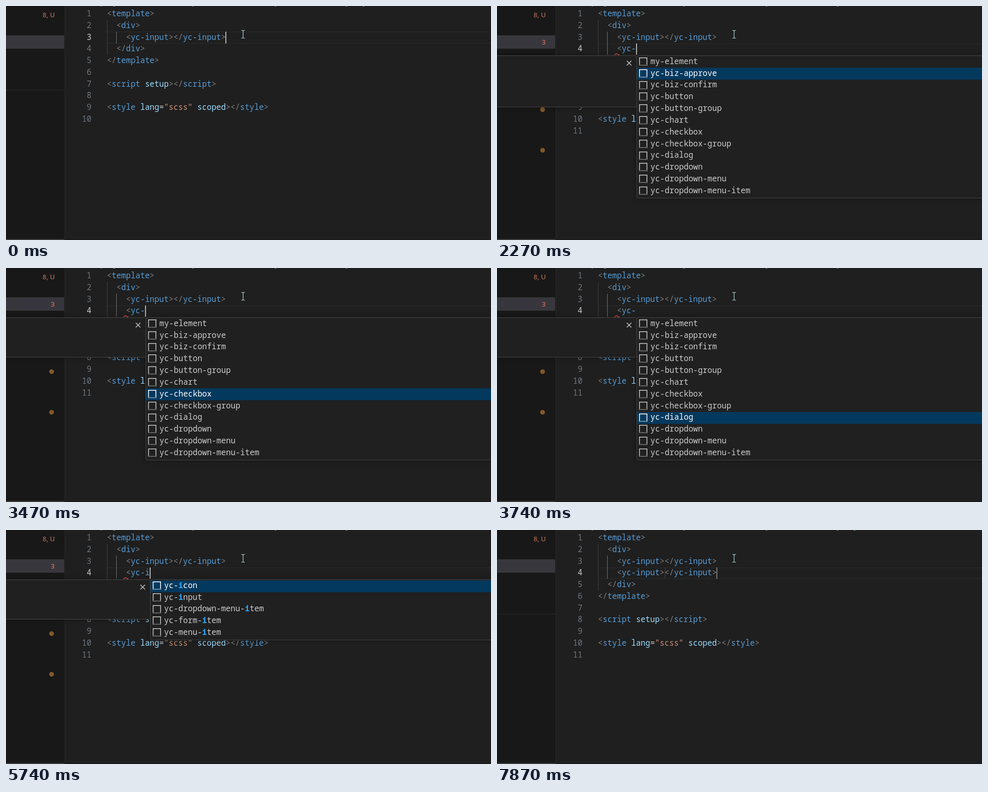
Animation of 942x455 px, one loop 8000 ms. Source, as an HTML page:

```html
<!DOCTYPE html>
<html lang="en">
<head>
<meta charset="utf-8">
<title>Component completion</title>
<style>
  html, body { margin: 0; width: 100%; height: 100%; overflow: hidden; background: #1f1f1f; }
  svg { display: block; }
  text { white-space: pre; font: 15.4px "Noto Sans Mono", "DejaVu Sans Mono", monospace; }
  .item { font-weight: 500; }
  .badge { font: 600 13px "Open Sans", "Noto Sans", sans-serif; }
  .popup { filter: drop-shadow(0 0 4px rgba(0, 0, 0, .4)); }
</style>
</head>
<body>
<svg id="stage" width="942" height="455" viewBox="0 0 942 455"></svg>
<script>
const LOOP = 8000, LEFT = 196, LINE = 22.78, ROW = 22.82;
const INPUT = '    <yc-input></yc-input>';

const ALL = ['my-element', 'yc-biz-approve', 'yc-biz-confirm', 'yc-button', 'yc-button-group',
  'yc-chart', 'yc-checkbox', 'yc-checkbox-group', 'yc-dialog', 'yc-dropdown',
  'yc-dropdown-menu', 'yc-dropdown-menu-item', 'yc-flow-chart'];
// Brackets mark the matched letters
const WITH_I = ['yc-[i]con', 'yc-[i]nput', 'yc-dropdown-menu-[i]tem', 'yc-form-[i]tem', 'yc-menu-[i]tem'];
const WITH_IN = ['yc-[in]put', 'yc-[i]co[n]'];

// Each step changes part of the editor state
const steps = [
  [0, { line: null, col: 25, caret: 1, list: null, sel: 0, scroll: 0, panel: 0,
        dots: false, badge: false, wave: false, crumb: true, ghost: false }],
  [530, { line: '    ', col: 4, crumb: false }],
  [660, { line: '    <', col: 5, dots: true }],
  [800, { list: ALL }],
  [1200, { line: '    <y', col: 6, badge: true, wave: true }],
  [1340, { line: '    <yc', col: 7 }],
  [1470, { line: '    <yc-', col: 8, panel: 196 }],
  [1870, { caret: 0 }],
  [2140, { sel: 1 }],
  [2270, { caret: 1 }],
  [2670, { sel: 2 }],
  [2800, { caret: 0 }],
  [2940, { sel: 3, panel: 173 }],
  [3070, { sel: 4 }],
  [3200, { sel: 5, caret: 1 }],
  [3470, { sel: 6 }],
  [3600, { sel: 7 }],
  [3740, { sel: 8, caret: 0 }],
  [4140, { sel: 9, caret: 1 }],
  [4400, { sel: 10 }],
  [4540, { sel: 11 }],
  [4670, { sel: 12, scroll: 20.8, caret: 0 }],
  [5200, { caret: 1 }],
  [5600, { caret: 0 }],
  [5740, { line: '    <yc-i', col: 9, caret: 1, list: WITH_I, sel: 0, scroll: 0 }],
  [6140, { caret: 0 }],
  [6540, { line: '    <yc-in', col: 10, caret: 1, list: WITH_IN }],
  [6940, { caret: 0 }],
  [7470, { line: INPUT, col: 14, caret: 1, list: null, panel: 0, wave: false }],
  [7600, { dots: false, badge: false }],
  [7740, { crumb: true }],
  [7870, { col: 25, caret: .6, ghost: true }],
];

const esc = s => s.replace(/&/g, '&amp;').replace(/</g, '&lt;').replace(/>/g, '&gt;');
const rect = (x, y, w, h, fill, more = '') =>
  `<rect x="${x}" y="${y}" width="${w}" height="${h}" fill="${fill}" ${more}/>`;
const text = (x, y, fill, body, more = '') =>
  `<text x="${x}" y="${y}" fill="${fill}" ${more}>${body}</text>`;
const path = (d, stroke, width = 1) =>
  `<path d="${d}" fill="none" stroke="${stroke}" stroke-width="${width}"/>`;
const span = (fill, s) => `<tspan fill="${fill}">${esc(s)}</tspan>`;
const lineTop = n => Math.round(4.2 + LINE * (n - 1));
const baseline = n => Math.round(20 + LINE * (n - 1));
const caretX = col => Math.round(195.8 + 9.225 * col);

function paintCode(code) {
  let prev = '';
  return code.replace(/<\/?|>|"[^"]*"|=|[\w-]+|\s+/g, tok => {
    let fill = '#9cdcfe';
    if (/^[<>]/.test(tok)) fill = '#808080';
    else if (tok[0] === '"') fill = '#ce9178';
    else if (tok === '=') fill = '#cccccc';
    else if (prev[0] === '<') fill = '#569cd6';
    prev = tok;
    return span(fill, tok);
  });
}

function sidebar(s) {
  let out = rect(0, 0, 114, 455, '#181818') + rect(114, 0, 1, 455, '#2b2b2b')
    + rect(0, 57, 113, 26, '#37373d') + rect(0, 163, 113, 1, '#2b2b2b')
    + rect(0, 453, 113, 2, '#3a3a3a') + rect(115, 454, 827, 1, '#181818')
    + text(95, 22, '#a5644f', '8, U', 'class="badge" text-anchor="end"');
  if (s.badge) out += text(94.5, 75, '#c8705a', '3', 'class="badge" text-anchor="end"');
  if (s.dots) for (const y of [201.5, 280.5])
    out += `<circle cx="88.5" cy="${y}" r="4.6" fill="#80592b"/>`;
  return out;
}

function editor(s) {
  const lines = ['<template>', '  <div>', INPUT];
  if (s.line !== null) lines.push(s.line);
  lines.push('  </div>', '</template>', '', '<script setup><\/script>', '',
    '<style lang="scss" scoped></style>', '');
  const active = s.line === null ? 3 : 4;
  const y = lineTop(active), end = lineTop(active + 1);

  let out = rect(LEFT, y, 746, 1, '#2a2a2a') + rect(LEFT, end - 1, 746, 1, '#2a2a2a')
    + rect(196, lineTop(2), 1, lineTop(active + 2) - lineTop(2), '#404040')
    + rect(214, lineTop(3), 1, end - lineTop(3), '#707070');
  for (const [x, w] of [[184, 2], [208, 4], [362, 3], [522, 3], [660, 3]])
    out += rect(x, 0, w, 1, '#8a8a8a');
  if (s.crumb) out += rect(693, 0, 3, 1, '#4ec9b0');

  lines.forEach((code, i) => {
    const n = i + 1;
    out += text(166, baseline(n), n === active ? '#cccccc' : '#6e7681', n, 'text-anchor="end"')
      + text(LEFT, baseline(n), '#cccccc', paintCode(code));
  });
  if (s.wave) out += path('M228 95.5L231 93L233 93L236 95.5L238 94', '#f14c4c', 1.3);
  if (s.ghost) out += rect(326, y, 1, end - y, '#454545');
  if (s.caret) out += rect(caretX(s.col), y, 2, end - y, '#aeafad', `opacity="${s.caret}"`);
  return out;
}

function label(item, selected) {
  const fill = selected ? '#ffffff' : '#cccccc';
  return item.split(/[\[\]]/).map((part, i) =>
    i % 2 ? `<tspan font-weight="700" fill="#2aaaff">${part}</tspan>` : span(fill, part)).join('');
}

function icon(x, y, fill) {
  let out = path(`M${x + .75} ${y + 14}V${y + .75}H${x + 15.25}V${y + 14}`, fill, 1.5);
  for (let i = 0; i < 6; i++) out += rect(x + i * 2.9, y + 14.5, 1.5, 1.5, fill);
  return out;
}

function popup(s) {
  if (!s.list) return '';
  const x = caretX(s.col) + 1, rows = Math.min(12, s.list.length), h = rows * ROW + 3.2;
  let out = '<g class="popup">';
  if (s.panel) {
    out += rect(-10, 96.5, x + 10.5, s.panel - 96, '#202020', 'stroke="#454545" rx="3"')
      + path(`M${x - 19} 106.5l9 9m0 -9l-9 9`, '#cccccc', 1.3);
  }
  out += rect(x + .5, 96.5, 960, h, '#202020', 'stroke="#454545" rx="3"') + '</g>'
    + `<clipPath id="rows"><rect x="${x + 1}" y="97" width="950" height="${h - 1}"/></clipPath>`
    + '<g clip-path="url(#rows)">';
  s.list.forEach((item, i) => {
    const y = 97.5 + ROW * i - s.scroll, on = i === s.sel;
    if (y < 90 || y > 97 + h - 5) return;
    if (on) out += rect(x + 1, Math.round(y), 950, 23, '#04395e');
    out += icon(x + 5, Math.round(y + 2.5), on ? '#ffffff' : '#c5c5c5')
      + text(x + 27, Math.round(y + 15.3), '#cccccc', label(item, on), 'class="item"');
  });
  return out + '</g>';
}

const pointer = path('M457 47.5H459.5L460.5 48.5L461.5 47.5H464M460.5 48V62M457 62.5H459.5L460.5 61.5L461.5 62.5H464', '#a9d3d6', 1.2);

let state = {};
const scenes = steps.map(([, change]) => {
  state = { ...state, ...change };
  return sidebar(state) + editor(state) + popup(state) + pointer;
});

const stage = document.getElementById('stage');
const begin = performance.now();
let shown = -1;

function draw() {
  const t = (performance.now() - begin) % LOOP;
  let i = steps.length - 1;
  while (steps[i][0] > t) i--;
  if (i !== shown) stage.innerHTML = scenes[shown = i];
  requestAnimationFrame(draw);
}
draw();
</script>
</body>
</html>
```
